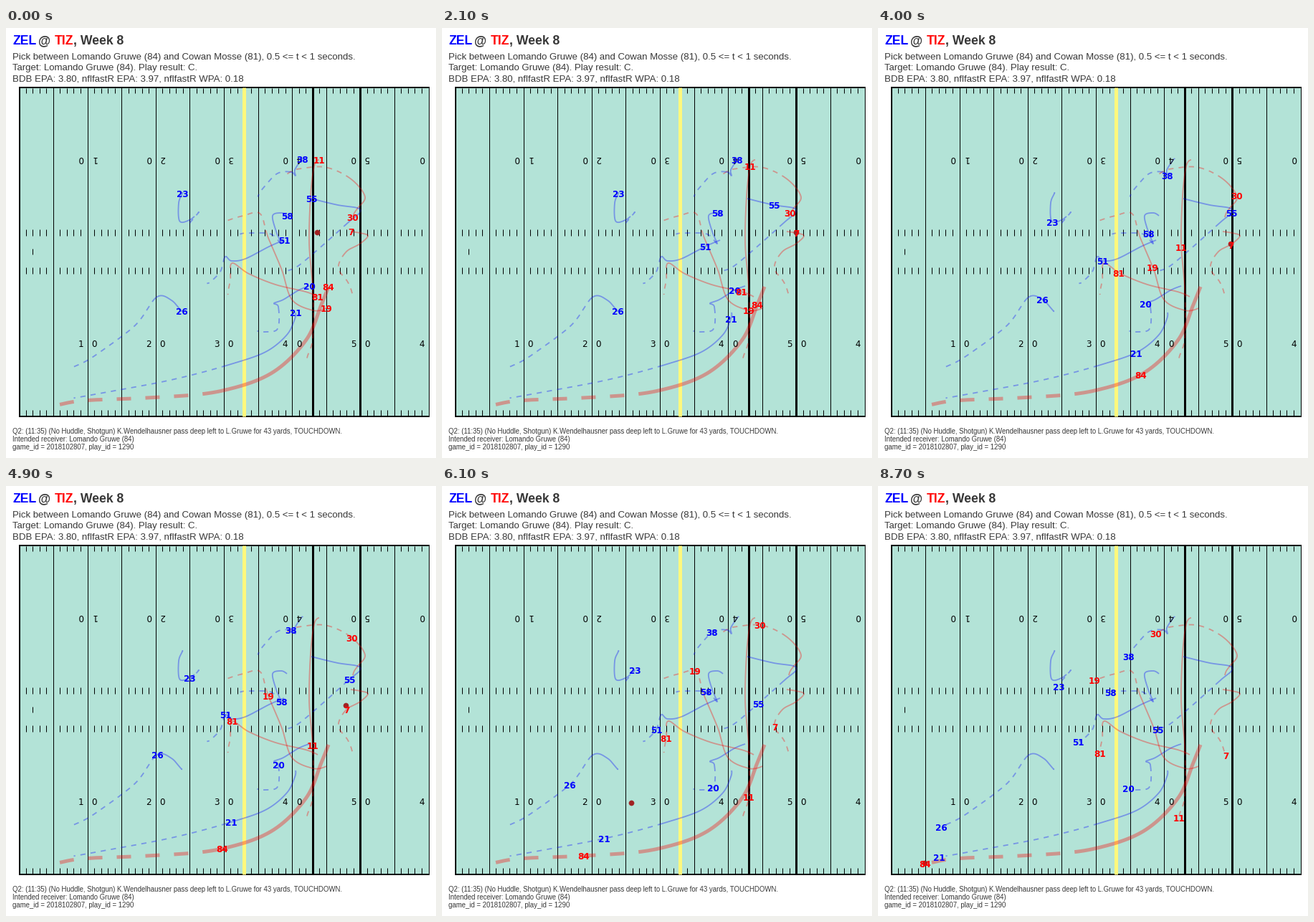
Recreate the animation shown at these times as a matplotlib script. Size 600 by 600 pixels, loop 8800 ms.

```python
import numpy as np
import matplotlib.pyplot as plt
from matplotlib.animation import FuncAnimation
from matplotlib.patches import Rectangle

DPI = 100
PX = 72 / DPI  # points per pixel
FRAMES = 88
SNAP, CAUGHT_SNAP, THROW, CATCH, TRAIL_END = 11, 17, 49, 70, 84
KEYS = np.array([SNAP, 21, 30, 39, THROW, 61, CATCH, 87])  # frames of the key points
BLUE, RED, INK = "#0000ff", "#ff0000", "#383838"
LEFT, RIGHT, TOP, BOTTOM = 19, 591, 83, 542

fig = plt.figure(figsize=(6, 6), dpi=DPI, facecolor="white")
ax = fig.add_axes([0, 0, 1, 1])
ax.set_xlim(0, 600)
ax.set_ylim(600, 0)
ax.axis("off")


def write(x, y, text, size, color=INK, family="Liberation Sans", va="baseline", **kw):
    return ax.text(x, y, text, fontsize=size * PX, color=color,
                   family=family, va=va, zorder=6, **kw)


def yard_x(yards):
    return 18.32 + 9.52 * yards


def vlines(xs, top, bottom, width=1, color="black"):
    ax.vlines(xs, top, bottom, colors=color, linewidths=width * PX, zorder=2)


def draw_field():
    ax.add_patch(Rectangle((LEFT, TOP), RIGHT - LEFT, BOTTOM - TOP,
                           facecolor="#b3e3d7", edgecolor="none", zorder=1))
    vlines([yard_x(y) for y in range(5, 61, 5)], TOP, BOTTOM)
    ticks = [yard_x(y) for y in range(1, 60) if y % 5]
    for top, bottom in ((84, 91), (281, 290), (334, 343), (533, 541)):
        vlines(ticks, top, bottom)
    vlines([yard_x(2)], 308, 316)
    vlines([LEFT], TOP - 1, BOTTOM + 1, 2)
    ax.hlines([TOP, BOTTOM], LEFT, RIGHT, colors="black", linewidths=2 * PX, zorder=2)
    vlines([yard_x(43), yard_x(50)], TOP, BOTTOM, 3)
    vlines([yard_x(33)], TOP, BOTTOM, 5, "#fff87c")

    style = dict(size=12, color="black", family="DejaVu Sans", ha="center")
    for mark in range(10, 61, 10):
        tens = str(min(mark, 100 - mark) // 10)
        for dx, low, high in ((-9.5, tens, "0"), (9.5, "0", tens)):
            x = yard_x(mark) + dx
            if x < RIGHT:
                write(x, 445, low, **style)
                write(x, 182.5, high, va="center", rotation=180, **style)


def draw_captions():
    for x, text, color in ((9, "ZEL", BLUE), (45, "@", INK),
                           (68, "TIZ", RED), (94, ", Week 8", INK)):
        write(x, 23, text, 17.6, color, weight="bold")
    notes = ("Pick between Lomando Gruwe (84) and Cowan Mosse (81), 0.5 <= t < 1 seconds.",
             "Target: Lomando Gruwe (84). Play result: C.",
             "BDB EPA: 3.80, nflfastR EPA: 3.97, nflfastR WPA: 0.18")
    footer = ("Q2: (11:35) (No Huddle, Shotgun) K.Wendelhausner pass deep left to "
              "L.Gruwe for 43 yards, TOUCHDOWN.",
              "Intended receiver: Lomando Gruwe (84)",
              "game_id = 2018102807, play_id = 1290")
    for lines, y, step, size in ((notes, 44, 15.2, 13.3), (footer, 566.5, 10.8, 9.7)):
        for i, line in enumerate(lines):
            write(9, y + step * i, line, size)


def follow(points, at):
    """Smooth run through the key points, standing still until the snap."""
    p = np.array(points, float)
    m = np.gradient(p, KEYS, axis=0)
    m[0] = 0
    at = np.clip(at, KEYS[0], KEYS[-1])
    i = np.clip(np.searchsorted(KEYS, at, side="right") - 1, 0, len(KEYS) - 2)
    h = (KEYS[i + 1] - KEYS[i])[:, None]
    s = (at - KEYS[i])[:, None] / h
    ease = s * s * (3 - 2 * s)
    return (p[i] + (p[i + 1] - p[i]) * ease
            + h * s * (1 - s) * ((1 - s) * m[i] - s * m[i + 1]))


def player(number, color, *points, width=1.8):
    for start, end, dash in ((SNAP, THROW + 1, "-"), (THROW + 1, TRAIL_END, (0, (4, 4)))):
        trail = follow(points, np.linspace(start, end, 240))
        ax.plot(*trail.T, color=color, alpha=0.34, lw=width * PX, ls=dash, zorder=4,
                solid_capstyle="butt", dash_capstyle="butt")
    label = write(0, 0, number, 12, color, "DejaVu Sans", weight="bold", ha="center")
    route = follow(points, np.arange(FRAMES))
    movers.append((label, route))
    return route


def ball_at(frame):
    if frame < CAUGHT_SNAP:
        s = max(0, frame - SNAP) / (CAUGHT_SNAP - SNAP)
        start, end = np.array([434, 285]), passer[CAUGHT_SNAP]
        return start + (end - start) * s
    if frame < THROW:
        return passer[frame] - (0, 1)
    if frame < CATCH:
        s = (frame - THROW) / (CATCH - THROW)
        start = passer[THROW] - (1, 6)
        return start + (receiver[CATCH] - start) * s ** np.array([0.92, 0.8])
    return receiver[frame] - (1, 1)


draw_field()
draw_captions()

movers = []
player("30", RED, (484, 264), (486, 258), (491, 251), (501, 236),
       (483, 212), (444, 194), (412, 196), (388, 206))
player("23", BLUE, (246, 231), (246, 231), (241, 244), (242, 269),
       (256, 268), (269, 257), (258, 270), (252, 280))
player("26", BLUE, (245, 395), (245, 395), (244, 394), (231, 380),
       (211, 375), (178, 417), (130, 453), (88, 476))
player("38", BLUE, (414, 183), (412, 184), (403, 198), (404, 206),
       (398, 201), (377, 204), (360, 222), (350, 238))
player("55", BLUE, (426, 238), (463, 247), (490, 251), (494, 257),
       (479, 270), (441, 304), (413, 328), (390, 340))
player("58", BLUE, (392, 262), (384, 258), (372, 262), (377, 284),
       (384, 301), (368, 287), (341, 286), (324, 288))
player("51", BLUE, (388, 296), (367, 305), (334, 322), (315, 325),
       (306, 319), (299, 340), (288, 352), (279, 357))
player("20", BLUE, (423, 360), (408, 366), (387, 379), (374, 384),
       (380, 389), (378, 421), (360, 424), (349, 422))
player("21", BLUE, (404, 397), (403, 406), (392, 428), (364, 451),
       (314, 469), (226, 492), (147, 507), (85, 518))
player("11", RED, (437, 184), (430, 193), (425, 234), (423, 299),
       (428, 362), (428, 434), (421, 457), (420, 463))
player("19", RED, (447, 391), (428, 394), (399, 379), (385, 338),
       (366, 293), (353, 258), (331, 262), (302, 271))
player("81", RED, (435, 375), (418, 368), (376, 358), (339, 343),
       (316, 328), (313, 352), (310, 366), (310, 373))
receiver = player("84", RED, (450, 361), (440, 386), (419, 435), (373, 480),
                  (302, 506), (198, 516), (122, 519), (66, 527), width=5)
passer = player("7", RED, (481, 284), (494, 286), (505, 290), (494, 301),
                (475, 312), (464, 336), (476, 353), (485, 376))

ball, = ax.plot([], [], "o", ms=7.2 * PX, mfc="#a02222", mec="#a02222", mew=0.3, zorder=5)


def update(frame):
    for label, route in movers:
        label.set_position(route[frame] + (0, 5.4))
    ball.set_data(*ball_at(frame)[:, None])
    return [ball] + [label for label, _ in movers]


anim = FuncAnimation(fig, update, frames=FRAMES, interval=100, repeat=True)
plt.show()
```
